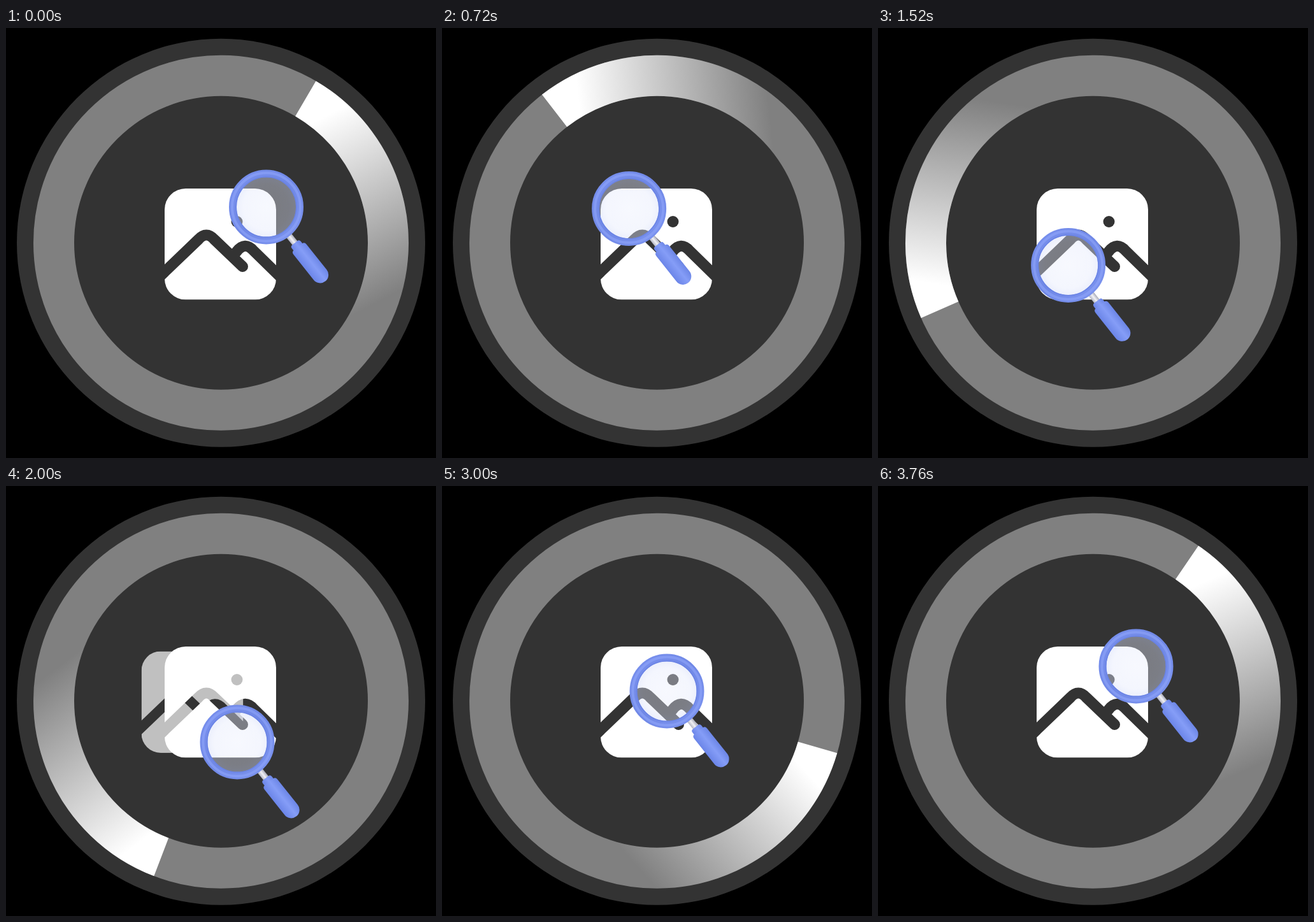
Recreate the animation shown at these times as an HTML page. Size 675 by 675 pixels, loop 3.8 s.

```html
<!DOCTYPE html>
<html lang="en">
<head>
<meta charset="utf-8">
<title>Image search loader</title>
<style>
html, body { margin: 0; width: 100%; height: 100%; overflow: hidden; background: #000; }
svg { display: block; }
</style>
</head>
<body>
<svg width="675" height="675" viewBox="0 0 675 675">
  <defs>
    <mask id="cut" maskUnits="userSpaceOnUse" x="240" y="240" width="200" height="200">
      <rect x="249" y="252" width="175" height="174.5" rx="33" fill="#fff"/>
      <circle cx="362.5" cy="304" r="9"/>
      <g fill="none" stroke="#000" stroke-width="17" stroke-linecap="round">
        <path d="M240 391.5L302 332Q314.5 318 327 332L371.5 374.5"/>
        <path d="M357 357L362 351Q375 334 389 350L434 394"/>
      </g>
    </mask>
    <rect id="card" x="249" y="252" width="175" height="174.5" fill="#fff" mask="url(#cut)"/>
    <linearGradient id="fade" gradientUnits="userSpaceOnUse" x1="100" y1="0" x2="-197" y2="0">
      <stop offset="0" stop-color="#fff"/>
      <stop offset="1" stop-color="#fff" stop-opacity="0"/>
    </linearGradient>
    <linearGradient id="rim" x1="0" y1="0" x2="1" y2="1">
      <stop offset="0" stop-color="#7890ee"/>
      <stop offset=".5" stop-color="#7088e6"/>
      <stop offset="1" stop-color="#7c94f0"/>
    </linearGradient>
    <linearGradient id="grip" x1="0" y1="0" x2="0" y2="1">
      <stop offset="0" stop-color="#6c86e6"/>
      <stop offset=".45" stop-color="#859df7"/>
      <stop offset="1" stop-color="#6b85e8"/>
    </linearGradient>
    <linearGradient id="metal" x1="0" y1="0" x2="0" y2="1">
      <stop offset="0" stop-color="#a9abb8"/>
      <stop offset=".5" stop-color="#f1f1f5"/>
      <stop offset="1" stop-color="#b4b6c4"/>
    </linearGradient>
    <radialGradient id="glass">
      <stop offset="0" stop-color="#eaeefd" stop-opacity=".38"/>
      <stop offset=".75" stop-color="#e4e9fc" stop-opacity=".41"/>
      <stop offset="1" stop-color="#d3dbf8" stop-opacity=".46"/>
    </radialGradient>
  </defs>
  <g transform="translate(337.5 337.25)" fill="none" stroke-width="64">
    <circle r="320.5" fill="#333"/>
    <circle r="262.5" stroke="#808080"/>
    <path id="arc" d="M139.1 222.6A262.5 262.5 0 0 1 -237.9 110.9" stroke="url(#fade)"/>
  </g>
  <g id="back"><use href="#card"/></g>
  <use href="#card"/>
  <g id="lens">
    <g transform="rotate(51.5)">
      <rect x="55" y="-5" width="20" height="10" fill="url(#metal)"/>
      <rect x="72" y="-9" width="16" height="18" rx="4" fill="url(#grip)"/>
      <path d="M85 -13H136A13 13 0 0 1 136 13H85Q80 13 80 8V-8Q80 -13 85 -13Z" fill="url(#grip)"/>
    </g>
    <circle r="48" fill="url(#glass)"/>
    <g fill="none">
      <circle r="52.5" stroke="url(#rim)" stroke-width="12"/>
      <circle r="53.5" stroke="#8fa5fa" stroke-width="4" opacity=".6"/>
      <circle r="47.3" stroke="#657fe2" stroke-width="1.5" opacity=".65"/>
    </g>
  </g>
</svg>
<script>
const LOOP = 3800, STEP = 40;
const HEAD = 30.4;      // clockwise angle of the bright edge when the loop starts
const DRAWN_AT = 148;   // clockwise angle of that edge in the arc's own path
const arc = document.getElementById("arc");
const lens = document.getElementById("lens");
const back = document.getElementById("back");

// time (ms), x, y, velocity x, velocity y (px/s)
const path = [
  [0, 408.5, 281, 75, -45],
  [400, 341, 269, -150, 10],
  [1040, 265.5, 314, -30, 110],
  [2000, 363, 402, 100, -10],
  [2560, 393, 364, -10, -100],
  [3000, 353, 322, -40, -70],
  [3760, 405, 283, 75, -45],
  [LOOP, 408.5, 281, 75, -45]
];

function hermite(p0, p1, v0, v1, dt, u) {
  const u2 = u * u, u3 = u2 * u;
  return (2 * u3 - 3 * u2 + 1) * p0 + (u3 - 2 * u2 + u) * dt * v0
    + (3 * u2 - 2 * u3) * p1 + (u3 - u2) * dt * v1;
}

function lensAt(t) {
  const i = path.findIndex((k, n) => n > 0 && t < k[0]);
  const a = path[i - 1], b = path[i];
  const span = b[0] - a[0], u = (t - a[0]) / span;
  return [1, 2].map(n => hermite(a[n], b[n], a[n + 2], b[n + 2], span / 1000, u));
}

function drawBack(t) {
  const p = (t - 1600) / 800;
  const on = p > 0 && p < 1;
  back.style.display = on ? "" : "none";
  if (!on) return;
  const e = p * p * (3 - 2 * p);
  back.setAttribute("opacity", 1 - Math.pow(e, 1.7));
  back.setAttribute("transform",
    `translate(${336.5 - 88 * e} 339) scale(${1 - 0.174 * e}) translate(-336.5 -339)`);
}

function draw(t) {
  arc.setAttribute("transform", `rotate(${HEAD - DRAWN_AT - 360 * t / LOOP})`);
  lens.setAttribute("transform", `translate(${lensAt(t).join(" ")})`);
  drawBack(t);
}

const start = performance.now();
function tick() {
  const t = (performance.now() - start) % LOOP;
  draw(Math.floor(t / STEP) * STEP);
  requestAnimationFrame(tick);
}
draw(0);
requestAnimationFrame(tick);
</script>
</body>
</html>
```
